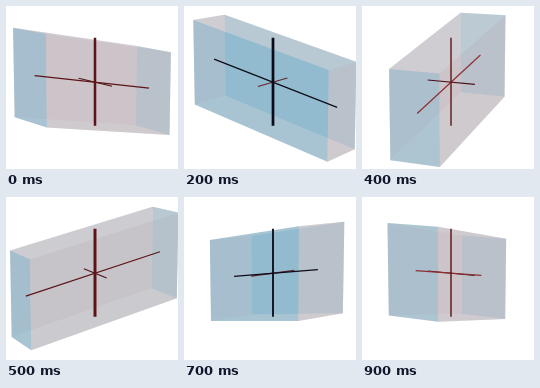
Write an HTML page with a canvas that moves like this. It is 172 px wide and 163 px high and loops after 1 s.

```html
<!DOCTYPE html>
<html>
<head>
<meta charset="utf-8">
<style>
  html, body { margin: 0; width: 100%; height: 100%; overflow: hidden; background: #fff; }
  canvas { display: block; }
</style>
</head>
<body>
<canvas id="stage" width="172" height="163"></canvas>
<script>
const ctx = document.getElementById('stage').getContext('2d');
const CX = 89, CY = 76.2, CAMERA = 900, TILT = 0.2;
const LONG = 74.5, SHORT = 26, TALL = 44.9, SKEW = 16;
// The box is a little longer and lower than the axes inside it
const BOX_SCALE = [1.075, 1, 0.978], BOX_DROP = 1.7;
// Heading of the slanted cell in degrees, one per 100 ms step
const HEADINGS = [-40, -3, 34.5, 77, 115, 154, 194, 236, 267, 296];
const COOL = [106, 162, 188], WARM = [187, 174, 180];
const sinT = Math.sin(TILT), cosT = Math.cos(TILT);

// x: right, z: towards the viewer, h: up
function project([x, z, h]) {
  const k = CAMERA / (CAMERA - z * cosT - h * sinT);
  return [CX + x * k, CY + (z * sinT - h * cosT) * k];
}

const combine = (vectors, weights) =>
  [0, 1, 2].map(d => vectors.reduce((sum, v, i) => sum + v[d] * weights[i], 0));

function signedArea(points) {
  return points.reduce((sum, [x, y], i) => {
    const [u, v] = points[(i + 1) % points.length];
    return sum + x * v - u * y;
  }, 0);
}

function faceColor(facing) {
  const t = Math.min(1, Math.max(0, 0.5 + 0.9 * facing));
  const mix = COOL.map((c, i) => Math.round(c + (WARM[i] - c) * t));
  return `rgba(${mix},0.48)`;
}

function makeFace(axes, axis, side, cos, sin) {
  const points = [[1, 1], [-1, 1], [-1, -1], [1, -1]].map(([p, q]) => {
    const weights = [];
    weights[axis] = side;
    weights[(axis + 1) % 3] = p;
    weights[(axis + 2) % 3] = q;
    const [x, z, h] = combine(axes, weights.map((w, i) => w * BOX_SCALE[i]));
    return project([x, z, h - BOX_DROP]);
  });
  const front = side * signedArea(points) < 0;
  const facing = side * (axis ? sin : cos) * (front ? 1 : -1);
  const color = axis === 2 ? 'rgba(186,188,196,0.42)' : faceColor(facing);
  return { points, front, color };
}

function fillFace({ points, color }) {
  ctx.fillStyle = color;
  ctx.beginPath();
  points.forEach(p => ctx.lineTo(...p));
  ctx.fill();
}

function drawAxis(v, width, color) {
  ctx.strokeStyle = color;
  ctx.lineWidth = width;
  ctx.beginPath();
  ctx.moveTo(...project(v));
  ctx.lineTo(...project(v.map(n => -n)));
  ctx.stroke();
}

function draw(degrees) {
  const angle = degrees * Math.PI / 180;
  const cos = Math.cos(angle), sin = Math.sin(angle);
  const axes = [
    [LONG * cos, LONG * sin, -SKEW],
    [SHORT * sin, -SHORT * cos, 0],
    [0, 0, TALL]
  ];
  ctx.fillStyle = '#fff';
  ctx.fillRect(0, 0, 172, 163);

  const faces = [];
  for (const axis of [2, 0, 1])
    for (const side of [-1, 1]) faces.push(makeFace(axes, axis, side, cos, sin));
  faces.filter(f => !f.front).forEach(fillFace);
  faces.filter(f => f.front).forEach(fillFace);

  const red = sin * cos < 0;
  const dark = red ? '#5c1418' : '#0c0c18';
  drawAxis(axes[1], 1.1, red ? '#4a1418' : '#64262a');
  drawAxis(axes[0], 1.2, red && Math.abs(cos) < 0.5 ? '#8c3034' : dark);
  drawAxis(axes[2], Math.max(1.3, 3.3 * Math.abs(cos)), dark);
}

function tick() {
  draw(HEADINGS[Math.floor(performance.now() % 1000 / 100)]);
  requestAnimationFrame(tick);
}
tick();
</script>
</body>
</html>
```
